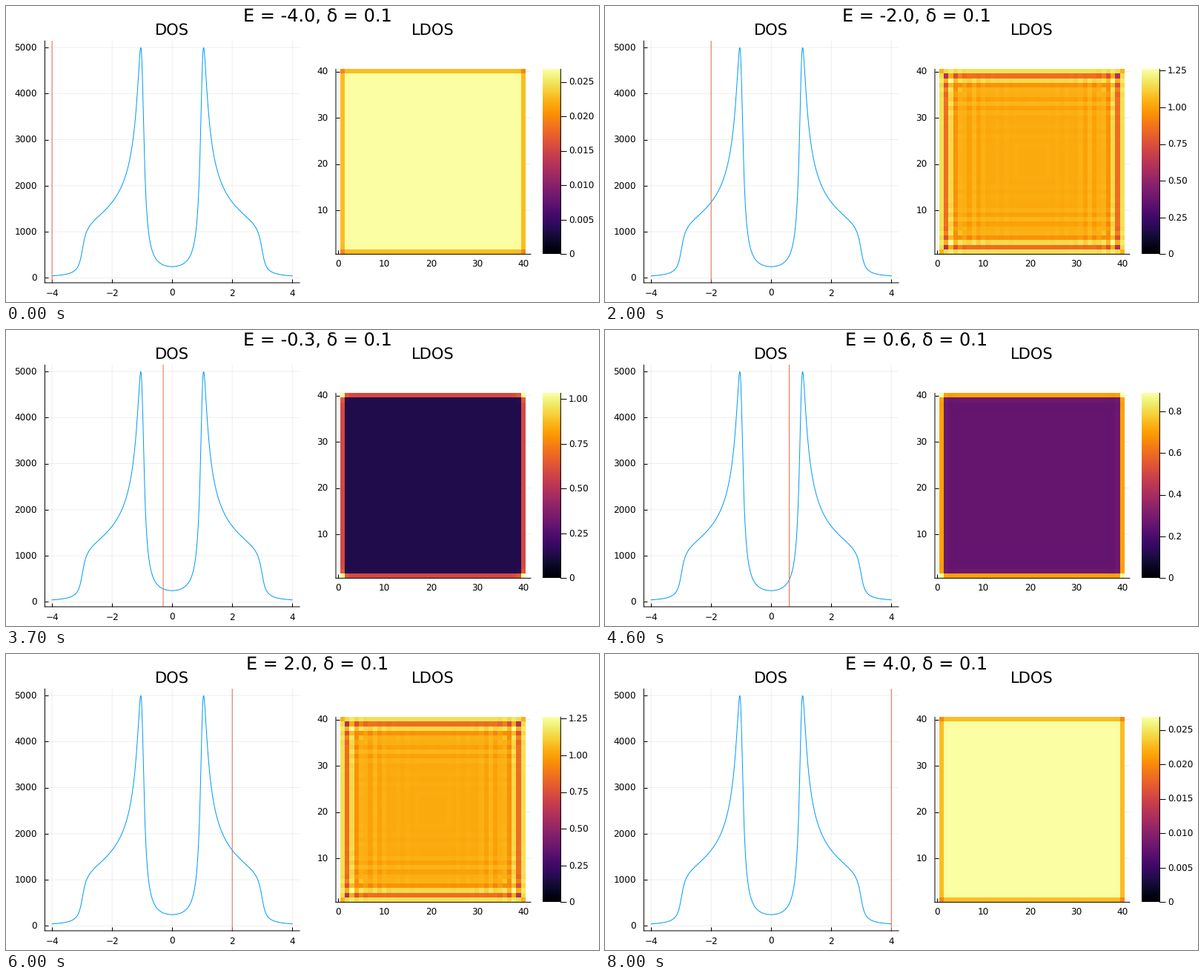
Write a matplotlib script that moves like this. It is 800 by 400 pixels and loops after 8100 ms.

```python
import numpy as np
import matplotlib.pyplot as plt
from matplotlib.animation import FuncAnimation

W, H, DPI = 800, 400, 100
PX = 72 / DPI                      # points per pixel
N, HALF, MASS, DELTA = 40, 20, 1.0, 0.1
ENERGIES = np.linspace(-4, 4, 81)

plt.rcParams.update({"font.family": "DejaVu Sans", "font.size": 12.03 * PX,
                     "text.hinting": "none", "path.snap": False})


def solve_lattice():
    """Levels and site weights of an open N x N Chern insulator.

    Fourfold rotation splits the problem into blocks living on one quadrant;
    particle-hole symmetry supplies the blocks left out here.
    """
    sx = np.array([[0, 1], [1, 0]])
    sy = np.array([[0, -1j], [1j, 0]])
    sz = np.diag([1, -1])
    one, shift = np.eye(N), np.eye(N, k=1)
    cos, sin = (shift + shift.T) / 2, (shift - shift.T) / 2j

    def term(a, b, spin):
        return np.kron(np.kron(a[:HALF], b[:HALF]), spin)

    rows = (term(sin, one, sx) + term(one, sin, sy) + term(cos, one, sz)
            + term(one, cos, sz) + MASS * term(one, one, sz))
    rows = rows.reshape(-1, N, N, 2)
    turn = np.exp([-0.25j * np.pi, 0.25j * np.pi])
    size = 2 * HALF * HALF
    levels, weights = [], []
    for phase in (np.pi / 4, 3 * np.pi / 4):
        block, rotated = 0, rows
        for j in range(4):
            block = block + np.exp(-1j * phase * j) * rotated[:, :HALF, :HALF]
            rotated = rotated.swapaxes(1, 2)[:, :, ::-1] * turn
        energy, vec = np.linalg.eigh(block.reshape(size, size))
        levels.append(energy)
        weights.append((abs(vec) ** 2).reshape(-1, 2, size).sum(1).T / 4)
    return np.concatenate(levels), np.concatenate(weights)


def broaden(energy, levels):
    e = np.asarray(energy)[:, None]
    return sum(DELTA / ((e - s * levels) ** 2 + DELTA ** 2) for s in (1, -1))


def nice_ticks(top):
    best, choice = -1, None
    for z in range(1, -5, -1):
        for q, niceness in ((5, 0.9), (2.5, 0.5), (2, 0.7), (1, 1.0)):
            step = q * 10.0 ** z
            count = int(top / step + 1e-9) + 1
            score = 1 - abs(count - 5) / 5 + niceness
            if 4 <= count <= 8 and score > best + 1e-9:
                best = score
                choice = step * np.arange(count), max(0, (q == 2.5) - z)
    ticks, digits = choice
    return ticks, ["0"] + [f"{t:.{digits}f}" for t in ticks[1:]]


def add_panel(left, top, right, bottom, spines):
    ax = fig.add_axes([left / W, 1 - bottom / H, (right - left) / W, (bottom - top) / H])
    ax.patch.set_visible(False)
    for side, spine in ax.spines.items():
        spine.set_visible(side in spines)
        spine.set_linewidth(PX)
    return ax


def style_axes(ax):
    ax.set_axisbelow(True)
    ax.grid(color="black", alpha=0.07, lw=PX)
    ax.tick_params(direction="in", length=5 * PX, width=PX)
    ax.tick_params(axis="x", pad=8.6 * PX)
    ax.tick_params(axis="y", pad=10.5 * PX)


def add_title(x, baseline, text, size):
    return fig.text(x / W, 1 - baseline / H, text, fontsize=size * PX,
                    ha="center", va="baseline")


levels, weights = solve_lattice()
quadrants = (broaden(ENERGIES, levels) @ weights).reshape(-1, HALF, HALF)
curve_x = np.linspace(-4, 4, 801)
curve_y = broaden(curve_x, levels).sum(1)

fig = plt.figure(figsize=(W / DPI, H / DPI), dpi=DPI, facecolor="white")
heading = add_title(420.5, 21.3, "", 24.05)
add_title(224, 38.5, "DOS", 21.05)
add_title(576.3, 38.5, "LDOS", 21.05)

dos = add_panel(52.4, 47.2, 396, 374, ("left", "bottom"))
style_axes(dos)
margin = 0.03 * np.ptp(curve_y)
dos.set(xlim=(-4.24, 4.24), ylim=(curve_y.min() - margin, curve_y.max() + margin),
        xticks=range(-4, 5, 2), yticks=range(0, 5001, 1000))
dos.plot(curve_x, curve_y, color="#009AFA", lw=PX)
marker = dos.axvline(-4, color="#E36F47", lw=PX)

ldos = add_panel(445, 85.4, 707.8, 335.4, ("left", "bottom"))
style_axes(ldos)
heat = ldos.imshow(np.zeros((N, N)), cmap="inferno", origin="lower", aspect="auto",
                   interpolation="nearest", extent=(0.5, 40.5, 0.5, 40.5), zorder=2)
ldos.set(xlim=(-0.524, 41.524), ylim=(0.5, 40.5),
         xticks=range(0, 41, 10), yticks=range(10, 41, 10))

bar = add_panel(724, 85.4, 748.3, 335.4, ("right",))
bar.imshow(np.arange(256)[:, None], cmap="inferno", origin="lower", aspect="auto",
           extent=(0, 1, 0, 1))
bar.set_xticks([])
bar.yaxis.tick_right()
bar.tick_params(axis="y", length=8 * PX, width=PX, pad=2.5 * PX)


def update(i):
    energy = ENERGIES[i]
    density = np.pad(quadrants[i], (0, HALF), mode="symmetric")
    top = density.max()
    heading.set_text(f"E = {round(energy, 1) + 0.0:.1f}, δ = {DELTA}")
    marker.set_xdata([energy, energy])
    heat.set_data(density)
    heat.set_clim(0, top)
    ticks, labels = nice_ticks(top)
    bar.set_yticks(ticks / top, labels)
    bar.set_ylim(0, 1)
    return heading, marker, heat


anim = FuncAnimation(fig, update, frames=len(ENERGIES), interval=100,
                     repeat=True, repeat_delay=0, blit=False)
plt.show()
```
